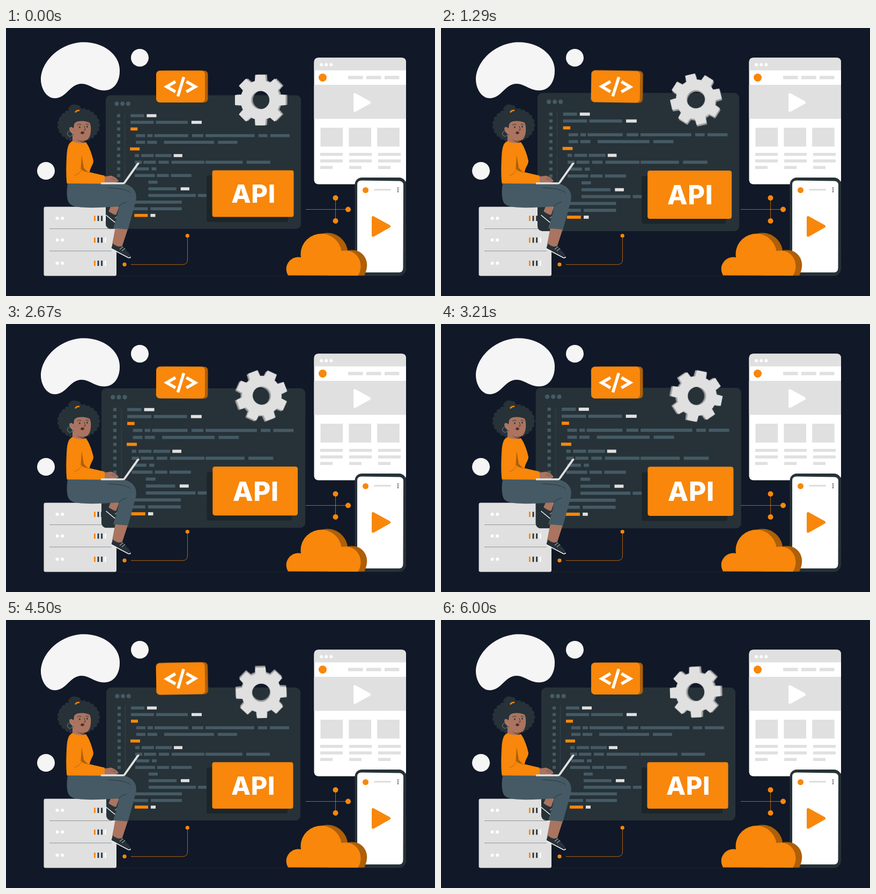
Recreate the animation shown at these times as an HTML page. Size 800 px wide and 500 px high, loop 6.04 s.

```html
<!DOCTYPE html>
<html lang="en">
<head>
<meta charset="utf-8">
<title>API illustration</title>
<style>
  html, body { margin: 0; width: 100%; height: 100%; overflow: hidden; background: #111827; }
  svg { display: block; width: 800px; height: 500px; }
  .orange { fill: #f8870b; }
  .amber { fill: #ae5f08; }
  .slate { fill: #455a64; }
  .dark { fill: #263238; }
  .grey { fill: #e0e0e0; }
  .white { fill: #fff; }
  .pale { fill: #f5f5f5; }
  .skin { fill: #aa7460; }
  .wire { fill: none; stroke: #f8870b; stroke-width: .7; }
  .thin { fill: none; stroke: #263238; stroke-width: .9; stroke-linecap: round; }
  .play { stroke-width: 5; stroke-linejoin: round; }
  #panel { transform-origin: 368px 250px; }
  #tag { transform-origin: 328px 109px; }
  #gear { transform-origin: 475.7px 134.3px; }
  #api { font: 800 47px Inter, "Open Sans", sans-serif; letter-spacing: .6px; }
</style>
</head>
<body>
<svg viewBox="0 0 800 500">
  <g class="pale">
    <path d="M65 96C66 58 106 26 146 26.500C183 27 211 50 212 77C213 101 201 116.500 183 116.500C165 116.500 156 104 141 104C119 104 113 131 91 131C75 131 65 112 65 96Z"/>
    <circle cx="249.500" cy="55.500" r="16.500"/>
    <circle cx="74.500" cy="266.500" r="16.500"/>
  </g>
  <path d="M206 462.300H742" stroke="#263238" stroke-width=".6"/>

  <g id="server">
    <rect class="grey" x="70.500" y="333.500" width="135.500" height="129" rx="3"/>
    <path d="M81 374.500H197M81 416H197" stroke="#8f9396" stroke-width="1"/>
  </g>

  <g id="panel">
    <rect class="dark" x="187" y="126" width="362" height="248" rx="9"/>
    <path d="M222.500 160V290" stroke="#37474f" stroke-width=".8"/>
    <g id="code"></g>
    <rect x="374" y="275" width="151" height="86" rx="4" fill="#1c2529"/>
    <rect class="orange" x="384.500" y="265.300" width="151" height="86.700" rx="4"/>
    <text id="api" class="white" x="461" y="326" text-anchor="middle">API</text>
  </g>

  <g id="tag">
    <rect class="amber" x="290" y="79.500" width="86.500" height="59.500" rx="7"/>
    <rect class="orange" x="280" y="79.500" width="91" height="59.500" rx="7"/>
    <path d="M316 100L299.500 109.500L316 119M336.500 100L353 109.500L336.500 119M331.500 91.500L320.500 127.500" fill="none" stroke="#fff" stroke-width="5.500"/>
  </g>

  <g id="gear" stroke-width="2" stroke-linejoin="round" fill-rule="evenodd"></g>

  <g id="wires">
    <path class="wire" d="M559 338.500H638M614.500 317V360M338.500 388V432Q338.500 441.300 329 441.300H233"/>
  </g>

  <g id="browser">
    <rect class="white" x="574.500" y="55.500" width="171.500" height="236" rx="8"/>
    <path class="grey" d="M574.500 79V63.500Q574.500 55.500 582.500 55.500H738Q746 55.500 746 63.500V79ZM574.500 106H746V169.500H574.500Z"/>
    <path class="white play" stroke="#fff" d="M650.500 124V154L677.500 139Z"/>
  </g>

  <g id="phone">
    <rect class="dark" x="650.500" y="279" width="95.500" height="183" rx="13"/>
    <path class="white" d="M663 284.500L734 285.500Q741 286 741 293L740.500 448Q740 456 733 456H663Q655 456 655 448V292Q655 284.500 663 284.500Z"/>
    <rect class="grey" x="686" y="300" width="32" height="3.600" rx="1.500"/>
    <path class="orange play" stroke="#f8870b" d="M684.500 353.500V387L714.500 370Z"/>
  </g>

  <path class="amber" d="M588 384A38 38 0 0 1 637 415C661 410 675 428 673 445Q672 455 668 461.700H600Z"/>
  <path class="orange" d="M526 461.500C516 445 530 424 550 428A38 38 0 0 1 625.500 416C650 411 662 430 661.500 445Q661 455 656.500 462Z"/>

  <g id="woman">
    <!-- far leg -->
    <path class="skin" d="M196 331L190 345L204 352L213 328Z"/>
    <path class="dark" d="M190 341L187 348.500L214 371L218 370Q218 365 212 359L209 348Q203 351 190 341Z"/>
    <path d="M186.500 349L214 371.500Q217 373 218.500 370" fill="none" stroke="#f0f0f0" stroke-width="1.600"/>
    <path d="M203 355L208 351M206 358L211 353" stroke="#e0e0e0" stroke-width="1"/>
    <!-- near leg -->
    <path class="skin" d="M204 372L198 403Q206 412 216 409L227.500 374Z"/>
    <path class="dark" d="M199 402L196.500 411L228 427.500L232 427Q232 422 226 417L218 406Q210 411 199 402Z"/>
    <path d="M196 411.500L228 428.500Q231 429.500 232.500 427" fill="none" stroke="#f0f0f0" stroke-width="1.600"/>
    <path d="M212 413L218 408M216 416L222 411" stroke="#e0e0e0" stroke-width="1"/>
    <path class="slate" d="M115 289.500C113 303 112 323 120 329C131 338 175 335 210 333Q212 336 200 373.500L227.500 376L242 323C246 304 235 291 213 290Z"/>
    <path class="thin" d="M210 333C214 329 218 326 224 325M190 298C207 299 224 300 232 307"/>
    <!-- hair -->
    <g class="dark" stroke="#263238">
      <ellipse cx="135.500" cy="181" rx="35.500" ry="28" stroke-width="9" stroke-linecap="round" stroke-dasharray="0 8"/>
      <ellipse cx="127" cy="149" rx="9" ry="6.500" stroke="none"/>
      <circle cx="119" cy="151" r="3" stroke="none"/>
      <circle cx="135" cy="147" r="3" stroke="none"/>
    </g>
    <path d="M129 157.500Q132 153 137 154" fill="none" stroke="#f8870b" stroke-width="2.500"/>
    <!-- head -->
    <path class="skin" d="M124 199V213Q134 221 146 212L144 205Z"/>
    <path d="M132 207Q138 212 145 210L145 214Q137 213 132 207Z" fill="#7b4b3d"/>
    <path class="skin" d="M128 173Q134 166 145 167Q156 171 158 183C159 195 157 209 147 210Q133 210 126 199Q118 194 118 187Q120 182 126 187Z"/>
    <path class="dark" d="M125 187Q126 175 135 174Q147 172 157 177L150 166L134 164L124 173Z"/>
    <circle cx="119.500" cy="197" r="5" fill="none" stroke="#8f9b9f" stroke-width=".8"/>
    <ellipse class="dark" cx="137.500" cy="185" rx="1.300" ry="1.800"/>
    <ellipse class="dark" cx="151.500" cy="184" rx="1.300" ry="1.800"/>
    <path class="thin" d="M133 181Q136 178 140 180M149 180Q152 178 154 180M146 183L148 190L145 191"/>
    <ellipse cx="142.500" cy="195.500" rx="3.300" ry="2.500" fill="#572c29"/>
    <!-- top and arm -->
    <path class="orange" d="M124 211C116 214 114 223 113 241C112 260 112 277 113.500 290L184 290.500V275.500L156 269C157 260 163 255 163 248C161 238 156 222 149 213Q136 217 124 211Z"/>
    <path class="amber" d="M141 237L139.500 262Q143 267 152 268L145 261Z"/>
    <path d="M139.500 262Q141 267 156 269.500M128 275Q137 272 140 266" fill="none" stroke="#ae5f08" stroke-width=".8"/>
    <path class="skin" d="M184 277L196 275.500Q207 279 210 286L205 288L184 289.500Z"/>
    <path d="M195 281L204 285M198 279L207 284" stroke="#7b4b3d" stroke-width=".7"/>
    <!-- laptop -->
    <path class="grey" d="M177 288H219L244 252.500Q247 249.500 249 252.500L223 289Q221.500 291.500 218 291.500H177Z"/>
  </g>
</svg>
<script>
const NS = "http://www.w3.org/2000/svg";
const byId = id => document.getElementById(id);

function add(parent, tag, attrs) {
  const el = document.createElementNS(NS, tag);
  for (const key in attrs) el.setAttribute(key, attrs[key]);
  return byId(parent).appendChild(el);
}
const dot = (parent, cls, cx, cy, r) => add(parent, "circle", { class: cls, cx, cy, r });
const bar = (parent, cls, x, y, width, height) =>
  add(parent, "rect", { class: cls, x, y, width, height });

// Code rows: start-end pairs, with an optional colour letter.
const rows = [
  "233-258 263-281w", "233-276 280-339 346-365w", "233-246o",
  "243-260 264-274 277-340 347-368 372-463 470-487 492-528",
  "243-260 264-282 295-388 395-431", "232-250o",
  "241-249 253-276 279-309 313-329w",
  "241-254 257-280 285-304 309-370 372-441 448-492",
  "243-267 272-281", "241-278 282-304 308-346", "266-283",
  "266-318 326-342w", "266-354 358-400", "230-328", "236-265 270-328",
  "240-265o 270-279w"
];
const rowClass = { w: "grey", o: "orange" };
rows.forEach((row, i) => {
  const y = 161.300 + i * 12.330;
  for (const part of row.split(" ")) {
    const [, a, b, c] = part.match(/(\d+)-(\d+)(\w?)/);
    bar("code", rowClass[c] || "slate", +a, y, b - a, 5.600);
  }
  if (i < 10) bar("code", "slate", 208, y, 6, 5.600);
});
for (let i = 0; i < 3; i++) dot("code", "slate", 207.500 + i * 10.600, 142, 4);

for (const y of [355, 395.500, 438.700]) {
  dot("server", "white", 95.500, y, 3);
  dot("server", "white", 105.200, y, 3);
  ["orange", "dark", "dark", "white"].forEach((cls, i) =>
    bar("server", cls, 164 + i * 6.600, y - 4.700, 2.800, 9.800));
}

for (const [x, y, r] of [[614.500, 317, 5], [614.500, 360, 5], [638, 338.500, 5],
                         [338.300, 387.500, 3.600], [221, 441.200, 3.600]])
  dot("wires", "orange", x, y, r);

for (let i = 0; i < 3; i++) {
  const x = 586 + i * 54;
  dot("browser", "white", 588 + i * 9.200, 68.500, 2.900);
  bar("browser", "grey", 638 + i * 34, 89.300, 27.500, 6.200);
  bar("browser", "grey", 586.500 + i * 52.800, 186, 41.700, 35.200);
  bar("browser", "grey", x, 233, 42, 5.600);
  bar("browser", "grey", x, 245.200, 42, 5.600);
  bar("browser", "grey", x, 257.400, 23, 5.600);
  dot("phone", "dark", 731, 298.600 + i * 3.400, 1.100);
}
dot("browser", "orange", 590.500, 92.500, 7.500);
dot("phone", "orange", 670.500, 302.500, 5.500);

function gearPath(cx, cy) {
  const point = (deg, r) => {
    const a = deg * Math.PI / 180;
    return (cx + r * Math.sin(a)).toFixed(2) + " " + (cy - r * Math.cos(a)).toFixed(2);
  };
  let d = "";
  for (let k = 0; k < 360; k += 45) {
    d += (k ? "L" : "M") + point(k - 15, 36) + "L" + point(k - 10.500, 47)
       + "L" + point(k + 10.500, 47) + "L" + point(k + 15, 36)
       + "A36 36 0 0 1 " + point(k + 30, 36);
  }
  return d + `ZM${cx - 18} ${cy}a18 18 0 1 0 36 0a18 18 0 1 0 -36 0Z`;
}
add("gear", "path", { d: gearPath(477.300, 134), fill: "#9e9e9e", stroke: "#9e9e9e" });
add("gear", "path", { d: gearPath(474.200, 134.500), fill: "#e0e0e0", stroke: "#e0e0e0" });

// Steps are [time in ms, value].
const LOOP = 6040;
function loop(id, fn, steps, delay = 0) {
  byId(id).animate(
    steps.map(([ms, value]) => ({ offset: ms / LOOP, transform: `${fn}(${value})` })),
    { duration: LOOP, iterations: Infinity, delay });
}
loop("panel", "scale", [[0, 1], [600, 1.1], [1800, 1], [2400, 1], [3000, 1.1], [3600, 1], [LOOP, 1]], -35);
loop("tag", "rotate", [[0, "0deg"], [1510, "1deg"], [4530, "-1deg"], [LOOP, "0deg"]]);
loop("gear", "rotate", [[0, "0deg"], [LOOP, "360deg"]]);
</script>
</body>
</html>
```
